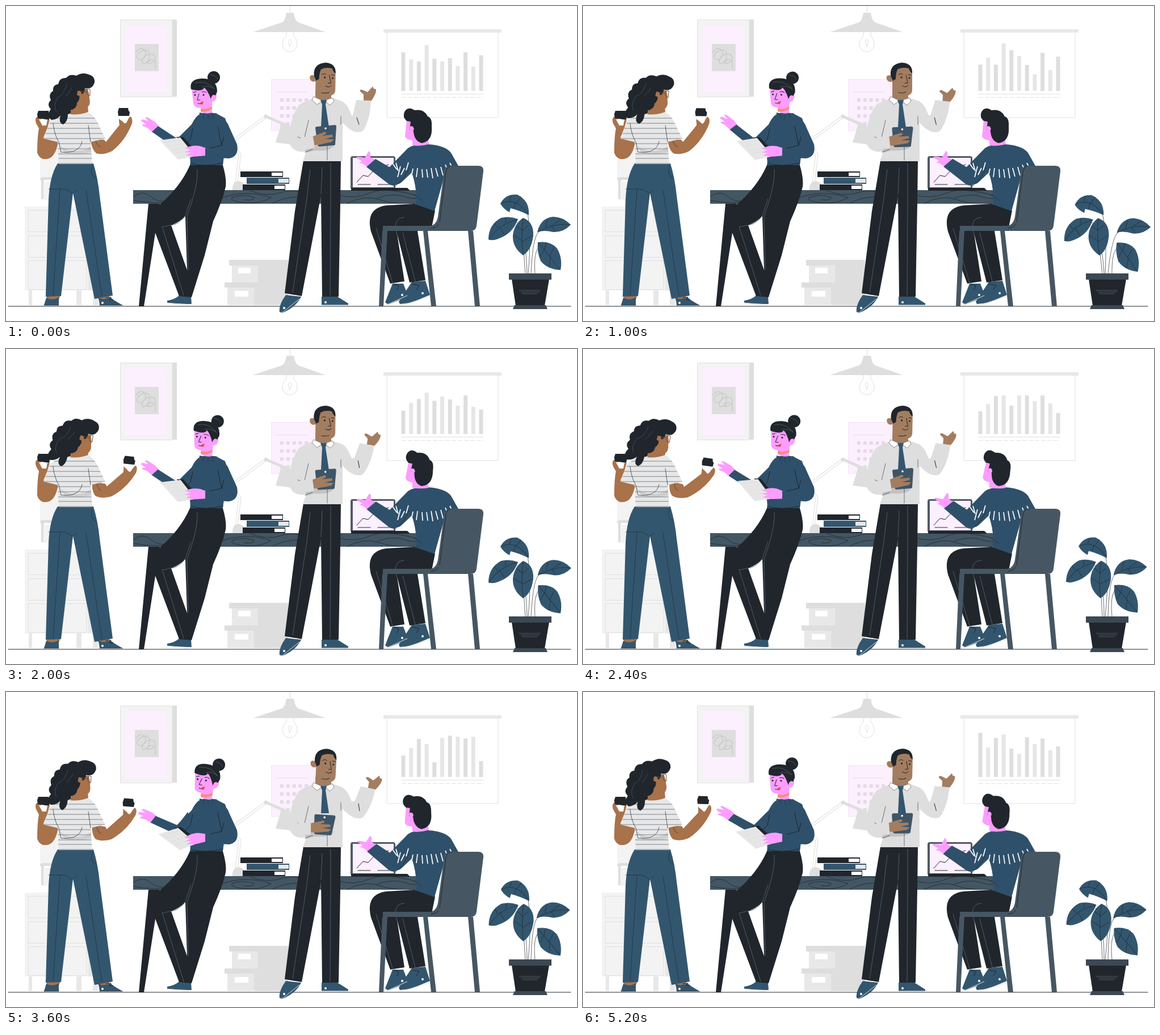
Write an HTML page that moves like this. It is 1006 px wide and 556 px high and loops after 5400 ms.

```html
<!DOCTYPE html>
<html lang="en">
<head>
<meta charset="utf-8">
<title>Office meeting</title>
<style>
html, body { margin: 0; width: 100%; height: 100%; overflow: hidden; background: #fff; }
svg { display: block; width: 100%; height: 100%; }
.dark { fill: #20262c; }
.blue { fill: #33566f; }
.knit { fill: #2f506a; }
.slate { fill: #465763; }
.pink { fill: #fc9dff; }
.tan { fill: #a37d60; }
.brown { fill: #a8724b; }
.shirt { fill: #dedede; }
.pale { fill: #fceffe; }
.g1 { fill: #f3f3f3; }
.g2 { fill: #e8e8e8; }
.g3 { fill: #dedede; }
.white { fill: #fff; }
.line { fill: none; stroke: #20262c; stroke-width: 1; stroke-linecap: round; stroke-linejoin: round; }
.soft { fill: none; stroke: #e0e0e0; stroke-width: 1; }
.seam { fill: none; stroke: #5e6870; stroke-width: .8; }
</style>
</head>
<body>
<svg viewBox="0 0 1006 556" preserveAspectRatio="none">
<defs>
  <clipPath id="teeShape"><path d="M107 191Q125 186 146 188Q158 195 166 216L175 234L149 240L152 279H93L91 240L66 234L78 203Q90 192 107 191Z"/></clipPath>
  <clipPath id="deskShape"><path d="M224 325H745V349H224Z"/></clipPath>
</defs>

<!-- room -->
<path class="line" d="M4 530H995"/>
<g id="picture">
  <path class="g3" d="M293 24H301V160H293Z"/>
  <path class="g1" stroke="#e0e0e0" d="M201.500 24.500H293V160.500H201.500Z"/>
  <path class="pale" d="M210 34H284V152H210Z"/>
  <path class="g3" d="M227 67H269V115H227Z"/>
  <path fill="none" stroke="#cbcbcb" stroke-width="1.500" d="M228 82Q238 70 245 79Q249 91 237 95Q225 92 235 82Q249 73 253 84Q253 101 241 102Q237 92 249 86Q264 82 263 94Q256 104 249 100Q254 91 263 97V111"/>
</g>
<g id="pendant">
  <path class="soft" d="M500.500 0V12"/>
  <path class="g3" d="M435 46L486 29Q492 26 494 12H507Q509 26 515 29L563 46Z"/>
  <path class="soft" d="M494 46V53Q487 59 487 68A13 13 0 0 0 513 68Q513 59 507 53V46M500 72L497 62Q500 56 503 62L500 72"/>
</g>
<g id="board">
  <path class="soft" d="M671 47V197H867V47"/>
  <path class="g2" d="M665 41H873V47H665Z"/>
  <path class="soft" d="M697 155.500H841"/>
  <path class="soft" stroke-dasharray="8 3" d="M697 161.500H841"/>
  <g id="bars"></g>
</g>
<g id="calendar">
  <path class="pale" stroke="#f3e3f5" d="M467.500 129.500H546V220H467.500Z"/>
  <path class="soft" d="M476 152H532"/>
  <path fill="none" stroke="#e3dbe6" stroke-width="6" stroke-dasharray="6 4.800" d="M483 166H534M483 180H534M483 194H534M483 208H534"/>
</g>
<g id="cabinet">
  <path class="g1" d="M60 250H104V302H60Z"/>
  <path class="g3" d="M62 341V309Q57 302 65 302H80V307H67V341Z"/>
  <path class="g1" d="M66 310H80V342H66Z"/>
  <path class="g1" d="M33 354H146V502H33Z"/>
  <path class="g2" d="M145 354H168V502H145ZM40 502H46V528H40ZM124 502H133V528H124ZM153 502H162V528H153Z"/>
  <path class="soft" d="M39 360.500H142V398.500H39ZM39 405.500H142V443.500H39ZM39 449.500H142V500.500H39Z"/>
</g>
<g id="boxes">
  <path class="g3" d="M393 448H497V458H393ZM440 458H497V488H440ZM385 488H497V497H385ZM436 497H497V528H436Z"/>
  <path class="g2" d="M398 458H444V488H398ZM390 497H437V528H390Z"/>
  <path class="white" d="M409 462H431V472H409ZM403 503H427V513H403Z"/>
</g>
<g id="deskLamp">
  <path fill="none" stroke="#dedede" stroke-width="5" stroke-linejoin="round" d="M406 312L412 262L396 241L458 195L493 210"/>
  <path fill="none" stroke="#fff" stroke-width="3" d="M406 312L412 262L396 241L458 195"/>
  <path class="g3" d="M399 325Q398 309 411 309Q423 312 424 325ZM486 205L500 211L506 245L475 241Z"/>
  <circle class="g3" cx="458" cy="195" r="3.500"/>
</g>

<!-- desk -->
<path class="dark" d="M251 349H271L243 530H234Z"/>
<path fill="#435663" d="M224 325H745V349H224Z"/>
<path class="line" stroke-opacity=".75" clip-path="url(#deskShape)" d="M224 337Q240 323 256 337T301 339Q324 348 345 331M224 343Q261 350 303 346T381 335M377 340Q399 331 423 331T467 338Q448 350 421 347Q395 345 398 338Q421 331 437 338Q437 344 420 342M430 326Q461 338 486 329T544 340M470 348Q506 329 552 343M581 332Q612 343 641 330T743 340M600 349Q632 332 659 342T741 348M654 339Q683 329 704 337T739 332"/>
<path class="dark" d="M413 292H488V302H413ZM417 315H492V325H417Z"/>
<path class="blue" d="M424 303H499V314H424Z"/>
<path class="white" d="M468 294H487V300H468ZM473 317H491V323H473Z"/>
<path class="g2" d="M480 305H498V312H480Z"/>
<path fill="#505b66" d="M611 265H682Q686 265 686 269V322H607V269Q607 265 611 265Z"/>
<path class="pale" d="M611 268H683V320H611Z"/>
<path class="line" stroke-width=".8" d="M618 311L629 299L638 301L652 286L674 280M620 315H642M655 315H676"/>
<path class="dark" d="M608 321H707L712 326H608Z"/>

<!-- woman with coffee -->
<g id="coffeeWoman">
  <path class="brown" d="M71 510H96L93 518H72ZM159 510H184L178 519H164Z"/>
  <path class="blue" d="M67 528L71 515Q82 521 93 514V528ZM163 515Q174 520 184 514L190 519L205 528H165Z"/>
  <path class="line" d="M67 528H93M165 528H205M176 515L185 514L182 518L188 519"/>
  <circle class="white" cx="170" cy="524" r="2"/>
  <path class="blue" d="M91 278H154Q162 304 165 335L188 511L156 517L118 330L97 512L70 513L75 342Q77 299 91 278Z"/>
  <path class="line" stroke-opacity=".6" d="M75 323H101Q111 325 116 331M116 331L125 325M95 323L83 511M141 325L169 512M152 283Q147 299 159 304"/>
  <path class="brown" d="M66 232L92 240Q88 264 76 269Q60 274 55 259Q55 231 58 216L53 207Q50 197 56 195L66 202L77 201L73 215Z"/>
  <path class="white" d="M58 200H73L71 211H64Z"/>
  <path class="dark" d="M57 185H75L76 190L78 192L76 201L56 198L55 191Z"/>
  <g id="cupArm">
    <path class="brown" d="M149 236L173 236L176 240L200 210L199 199L205 204L211 207L218 195Q224 198 222 207Q211 237 187 256Q171 264 159 260Q151 253 149 236Z"/>
    <g id="cup">
      <path class="white" d="M199 194H216L213 207H202Z"/>
      <path class="dark" d="M199 180H215L216 185L218 187L217 194H198L197 187Z"/>
      <path class="brown" d="M199 200Q205 202 210 209L219 195Q224 198 221 206L211 216L200 211Z"/>
    </g>
    <path class="line" stroke-opacity=".5" d="M158 238Q160 246 167 249"/>
  </g>
  <g clip-path="url(#teeShape)">
    <path fill="#e7e7e7" d="M60 180H185V285H60Z"/>
    <path fill="#cecece" d="M94 246Q113 261 141 253L152 246V258Q125 264 104 260Z"/>
    <path fill="none" stroke="#78848d" stroke-width="1" d="M60 198h120m-120 9h120m-120 9h120m-120 9h120m-120 9h120m-120 9h120m-120 9h120m-120 9h120m-120 8h120m-120 9h120"/>
  </g>
  <path class="line" stroke-opacity=".7" d="M83 207Q85 227 93 240L97 258Q130 261 134 239M149 240L145 211"/>
  <path class="brown" d="M113 191L119 166H143L145 187Q128 193 113 191Z"/>
  <g id="coffeeHead">
    <path class="brown" d="M123 146H143Q147 153 147 163Q150 176 141 180L123 182Z"/>
    <path class="dark" d="M156 135Q157 124 146 121Q135 116 124 123Q112 119 106 127Q94 126 92 138Q82 139 83 150Q74 155 79 166Q71 174 79 182Q70 194 80 201Q91 200 96 193Q92 207 101 209Q109 204 109 191Q116 190 114 184Q125 181 125 171Q132 164 128 154Q138 159 139 145Q152 148 156 135Z"/>
    <path fill="none" stroke="#66503f" d="M132 151H142M148 147Q142 145 142 153Q144 159 148 158V147"/>
    <path class="brown" d="M126 150Q133 148 133 156Q130 161 125 157Z"/>
    <path fill="none" stroke="#4d5860" stroke-width=".7" d="M107 137Q102 158 91 161Q82 177 89 187M116 144Q110 155 105 160"/>
  </g>
</g>

<!-- woman with papers -->
<g id="paperWoman">
  <path class="blue" d="M284 520Q298 518 306 510L326 513L327 526H318L284 524Z"/>
  <path class="soft" d="M284 524L319 528L327 526"/>
  <path class="dark" d="M324 281H382Q389 305 387 319Q381 345 365 380L350 440L327 514L305 512L258 387Q255 365 269 352Q307 320 324 281Z"/>
  <path class="white" d="M291 387Q305 382 316 371L319 466Z"/>
  <path class="seam" d="M326 340L316 370Q304 387 289 387L276 390M337 288Q339 316 319 371L321 466M275 389L313 511"/>
  <g id="reachArm">
    <path class="pink" d="M257 222L249 215L240 211Q239 208 247 209L238 203L240 200L251 203L245 197L249 196L263 205L270 213Z"/>
    <path class="knit" d="M268 212L303 235L325 215L330 241Q309 257 294 248L257 222Z"/>
  </g>
  <path class="knit" d="M343 190Q355 186 371 190L386 198L391 213L382 281H324Q326 270 322 260L310 250L301 235L327 209Q334 194 343 190Z"/>
  <path class="line" d="M310 250L325 235L329 216M327 278Q350 285 382 277"/>
  <g id="papers">
    <path class="dark" d="M300 231H312L341 263L331 267Z"/>
    <path fill="#e6e6e6" d="M271 237L307 232L334 265L303 271Z"/>
    <path class="soft" stroke="#b4b4b4" d="M279 241L307 237M285 247L311 243M292 254L317 249M298 260L321 256"/>
    <path class="pink" d="M315 251Q327 245 341 247L353 251V264L330 266L317 263L326 259L315 258L325 254Z"/>
  </g>
  <path class="knit" d="M367 203Q387 195 393 213L407 244Q411 266 393 269L351 267V251L379 246Z"/>
  <path class="line" d="M373 213L380 246L359 251M380 246L384 231"/>
  <path class="knit" d="M341 188Q357 193 371 189V203H340Z"/>
  <path class="line" stroke-opacity=".5" d="M348 191V198M356 192V199M364 191V198"/>
  <g id="paperHead">
    <path class="pink" d="M327 145Q338 145 345 136L370 150Q374 168 363 169V188Q354 192 343 187V180Q331 180 330 171Z"/>
    <path fill="#fa8c72" d="M343 181Q352 184 363 177V181Q352 189 343 186Z"/>
    <circle class="dark" cx="366" cy="126" r="11"/>
    <path class="dark" d="M326 147Q322 129 345 128Q372 128 372 151L369 158Q363 154 361 164Q355 148 349 144Q347 152 326 147Z"/>
    <path fill="none" stroke="#5d6870" stroke-width=".7" d="M332 136Q351 130 366 145M345 143Q357 139 367 146M359 121Q371 123 373 129"/>
    <path class="line" d="M330 153L335 151M345 152Q350 150 353 153M340 155L337 166H342M338 172Q343 174 347 169"/>
    <circle class="dark" cx="333" cy="157" r="1.500"/><circle class="dark" cx="348" cy="157" r="1.500"/>
    <path fill="#d74b43" d="M343 170L348 168L346 174L341 173Z"/>
  </g>
</g>

<!-- man with tablet -->
<g id="tabletMan">
  <path class="blue" d="M482 540Q480 528 493 510L520 513Q511 532 486 542ZM556 513H584L603 525V528H556Z"/>
  <path class="soft" d="M482 541H487L517 517M556 528H603"/>
  <circle class="white" cx="490" cy="533" r="2"/><circle class="white" cx="563" cy="523" r="2"/>
  <path class="dark" d="M524 273H590L589 348L586 513H557L555 334L521 512L491 507L509 362Z"/>
  <path class="seam" d="M536 288L530 340L505 506M572 277V340L571 512M557 285L555 332"/>
  <g id="waveArm">
    <path class="tan" d="M630 168V156L624 151Q622 147 628 148L637 152L646 142L648 146L652 147Q653 155 643 168Z"/>
    <path class="shirt" d="M617 166L643 167Q642 198 630 219Q623 226 613 219L600 198L611 193Z"/>
    <path class="line" d="M618 197L622 209"/>
  </g>
  <path class="shirt" d="M520 172L543 162H575L592 168Q601 173 606 186L622 222Q610 225 593 206V274H523L529 257Q500 261 497 231Q506 181 520 172Z"/>
  <path fill="#c2c2c2" d="M527 246L578 246Q572 257 544 255L528 259Z"/>
  <path class="line" stroke-opacity=".6" d="M533 202L525 236L514 231M590 195V209M566 247V272M527 258L540 253"/>
  <path class="tan" d="M545 150H573V164L559 168L545 161Z"/>
  <path class="white" stroke="#5c6268" stroke-width=".7" d="M542 160L558 167L548 174L539 166ZM575 162L560 167L571 175L578 168Z"/>
  <path class="blue" d="M554 166H565L563 174L569 214H555L557 174Z"/>
  <g id="tablet">
    <path fill="#3e5568" d="M547 213L579 210Q582 210 582 213L580 244Q580 246 576 246L553 248Q549 248 549 244L545 216Q545 213 547 213Z"/>
    <circle class="white" cx="563" cy="216" r="1.800"/>
    <path class="tan" d="M531 235L546 228L562 222L565 225L557 229L575 227L576 231L562 235L578 235L574 240L551 245L531 247Z"/>
    <path class="shirt" d="M519 231L541 231L544 250L519 255Z"/>
  </g>
  <g id="tabletHead">
    <path class="tan" d="M543 123Q533 120 535 129Q538 136 545 133V155Q558 162 572 158Q580 156 580 148V121Q580 106 562 103Q544 105 543 123Z"/>
    <path class="dark" d="M542 123Q540 102 562 100Q581 101 580 119Q575 115 574 110Q562 107 554 112Q551 119 551 129L546 132Z"/>
    <path class="line" d="M556 121Q560 118 563 121M573 121L578 122M569 122L572 136H567M563 141Q568 145 573 140M556 153Q563 155 569 152"/>
    <circle class="dark" cx="561" cy="126" r="1.600"/><circle class="dark" cx="575" cy="127" r="1.500"/>
  </g>
</g>

<!-- seated man -->
<g id="seatedMan">
  <path class="blue" d="M668 523L681 490H700L707 508L693 519L673 527ZM692 522L715 487L739 485L747 510L713 524L694 526Z"/>
  <path class="soft" d="M668 526H674L707 511M692 527H701L747 513"/>
  <path class="line" d="M683 491L692 494L689 501M716 491L728 493L723 501"/>
  <circle class="white" cx="698" cy="510" r="2"/><circle class="white" cx="734" cy="507" r="2"/>
  <path class="dark" d="M720 349L756 361L750 391H724L739 484L711 488L689 402L702 486L677 490L643 398Q633 357 670 352Z"/>
  <path class="seam" d="M689 404Q680 374 702 373M652 392L681 488M699 400L721 486"/>
  <g id="typeArm">
    <path class="pink" d="M638 285L628 278L622 277L627 274L617 268Q617 264 632 268L639 256L642 259V267L652 272Z"/>
    <path class="knit" d="M651 270L687 291L698 306Q686 323 674 314L635 284Z"/>
  </g>
  <path class="knit" d="M708 251Q718 243 743 244Q774 246 784 259L798 284L776 287L755 362L722 350Q725 324 715 294L698 310Q689 319 678 310L673 287Z"/>
  <path class="line" stroke-opacity=".6" d="M710 285Q706 300 686 318M718 333L733 343"/>
  <path fill="none" stroke="#fff" stroke-width="1.700" d="M681 278L689 289M687 277L691 291M695 283L690 302M702 286L696 298M709 276L705 290M717 287L714 302M725 286L723 302M733 288L734 303M741 288L743 303M749 286L752 304M757 286L761 301M766 284L770 299M774 280L779 293M782 277L787 287"/>
  <g id="seatedHead">
    <path class="pink" d="M706 201L703 230Q705 236 716 237V246Q730 248 745 244L739 205Z"/>
    <path class="dark" d="M706 203Q698 196 702 187Q708 176 720 184Q737 181 743 195Q751 197 750 213Q752 239 732 242Q719 238 718 221L711 218L713 204Z"/>
    <path class="pink" d="M711 217Q711 210 717 213Q721 218 715 223Z"/>
  </g>
</g>
<g id="chair">
  <path class="slate" d="M663 397H672L665 530H657ZM735 397H743L758 530H749ZM814 397H823L835 530H826Z"/>
  <path class="slate" d="M664 388H747Q758 387 761 372L772 292Q774 282 784 282H832Q842 282 841 292L829 388Q828 397 818 397H664Z"/>
  <path class="line" d="M764 381L775 293Q777 282 786 282M762 385Q758 392 749 392"/>
</g>

<!-- plant -->
<g id="plant">
  <g id="rightLeaves">
    <path class="line" stroke-opacity=".65" d="M925 473Q928 400 941 397M932 473Q929 432 940 425"/>
    <path class="blue" d="M936 399Q942 374 964 372Q981 372 995 386Q982 400 964 399Q948 395 936 399ZM937 417Q960 414 971 428Q981 445 977 466Q954 465 942 450Q935 434 937 417Z"/>
    <path class="line" stroke-opacity=".65" d="M937 399Q966 382 994 386M951 390L954 377M964 386L977 377M961 387L967 397M938 418Q955 438 976 465M949 430L951 418M958 441L965 427M948 430L942 442M959 442L957 460"/>
  </g>
  <g id="leftLeaves">
    <path class="line" stroke-opacity=".65" d="M915 473L912 431M920 473Q926 407 919 366M918 473Q917 409 901 382"/>
    <path class="blue" d="M871 349Q880 331 901 333Q923 344 921 369Q905 361 889 357L887 364Q876 358 871 349ZM850 412Q850 386 872 374Q887 370 902 376Q893 402 867 411Q857 415 850 412ZM911 374Q930 381 929 405Q926 431 911 440Q892 426 893 405Q895 385 911 374Z"/>
    <path class="line" stroke-opacity=".65" d="M873 348Q898 337 920 367M887 344L890 335M900 347L907 337M898 346L895 357M851 412Q869 384 901 377M866 392L861 384M880 383L881 374M869 389L878 403M911 375Q907 408 911 439M909 395L900 388M909 397L920 387M909 414L895 405M909 416L926 406"/>
  </g>
  <path class="dark" d="M891 482H957L949 529H898Z"/>
  <path fill="#3c4853" d="M886 472H961V483H886ZM896 528H951L954 535H893Z"/>
  <path class="seam" d="M904 502H942M907 505H940M909 508H936"/>
</g>
</svg>
<script>
const LOOP = 5400, STEP = 200;
const keyTimes = [0, 600, 1400, 2400, 3600, 4400, 5200, LOOP];

// Each joint: pivot x, pivot y, angles at the key times.
const joints = {
  coffeeHead:  [112, 185, [0, 3, 7, 10, 3, 6, -2]],
  cupArm:      [163, 250, [0, -3.5, 4.5, 14, 9.5, 14.5, 4.5]],
  cup:         [209, 200, [0, 2, -2.5, -6, -5, -7, -2.5]],
  paperHead:   [355, 185, [0, -2, 8, 6, 9, 2, 2]],
  reachArm:    [304, 240, [0, 7, 2, -2, -10, 9, -5]],
  papers:      [350, 258, [0, 0, -2, 3, -10, -10, -7]],
  tabletHead:  [559, 160, [1, 0, 0, 1, 3, 0, 1]],
  waveArm:     [618, 215, [0, -3, 11, 5, 9.5, 11, 3]],
  seatedHead:  [732, 240, [0, -2, 2, 6, -2, 0, 3]],
  typeArm:     [684, 303, [0, 3, -2, 3, 3, -1, -2]],
  leftLeaves:  [920, 472, [0, -2.4, -1.8, 1, .4, .5, 1.4]],
  rightLeaves: [927, 472, [0, 3.5, 3.5, -1, -1, -1, -1.5]]
};
const tabletDrop = [0, .2, .5, 0, 1, 1, .5];

const barTops = [
  [82, 100, 107, 110, 112, 95, 72],
  [94, 90, 92, 97, 99, 98, 98],
  [98, 109, 98, 83, 83, 82, 81],
  [69, 64, 68, 82, 92, 83, 75],
  [93, 81, 75, 100, 124, 112, 100],
  [98, 89, 87, 82, 81, 97, 109],
  [92, 106, 102, 82, 77, 79, 80],
  [106, 126, 115, 92, 79, 86, 92],
  [82, 83, 82, 82, 82, 82, 82],
  [107, 112, 114, 96, 79, 90, 103],
  [87, 84, 95, 113, 122, 107, 96]
];

const byId = id => document.getElementById(id);
const bars = barTops.map((tops, i) => {
  const bar = document.createElementNS("http://www.w3.org/2000/svg", "rect");
  bar.setAttribute("x", 696.5 + i * 13.7);
  bar.setAttribute("width", 7);
  bar.setAttribute("fill", i % 2 ? "#e6e6e6" : "#dedede");
  byId("bars").append(bar);
  return bar;
});

function sample(values, time) {
  let i = 0;
  while (time >= keyTimes[i + 1]) i++;
  const part = (time - keyTimes[i]) / (keyTimes[i + 1] - keyTimes[i]);
  const eased = (1 - Math.cos(Math.PI * part)) / 2;
  const next = values[(i + 1) % values.length];
  return values[i] + (next - values[i]) * eased;
}

function draw(now) {
  let step = Math.floor(now % LOOP / STEP);
  if (step === 13 || step === 23) step--; // two poses rest for a double beat
  const time = step * STEP;

  for (const [id, [x, y, angles]] of Object.entries(joints))
    byId(id).setAttribute("transform", `rotate(${sample(angles, time)} ${x} ${y})`);

  const drop = sample(tabletDrop, time);
  byId("tablet").setAttribute("transform",
    `translate(${-4 * drop} ${5 * drop}) rotate(${9 * drop} 563 230)`);

  bars.forEach((bar, i) => {
    const top = sample(barTops[i], time);
    bar.setAttribute("y", top);
    bar.setAttribute("height", 150 - top);
  });
}

const start = performance.now();
function tick() {
  draw(performance.now() - start);
  requestAnimationFrame(tick);
}
tick();
</script>
</body>
</html>
```
